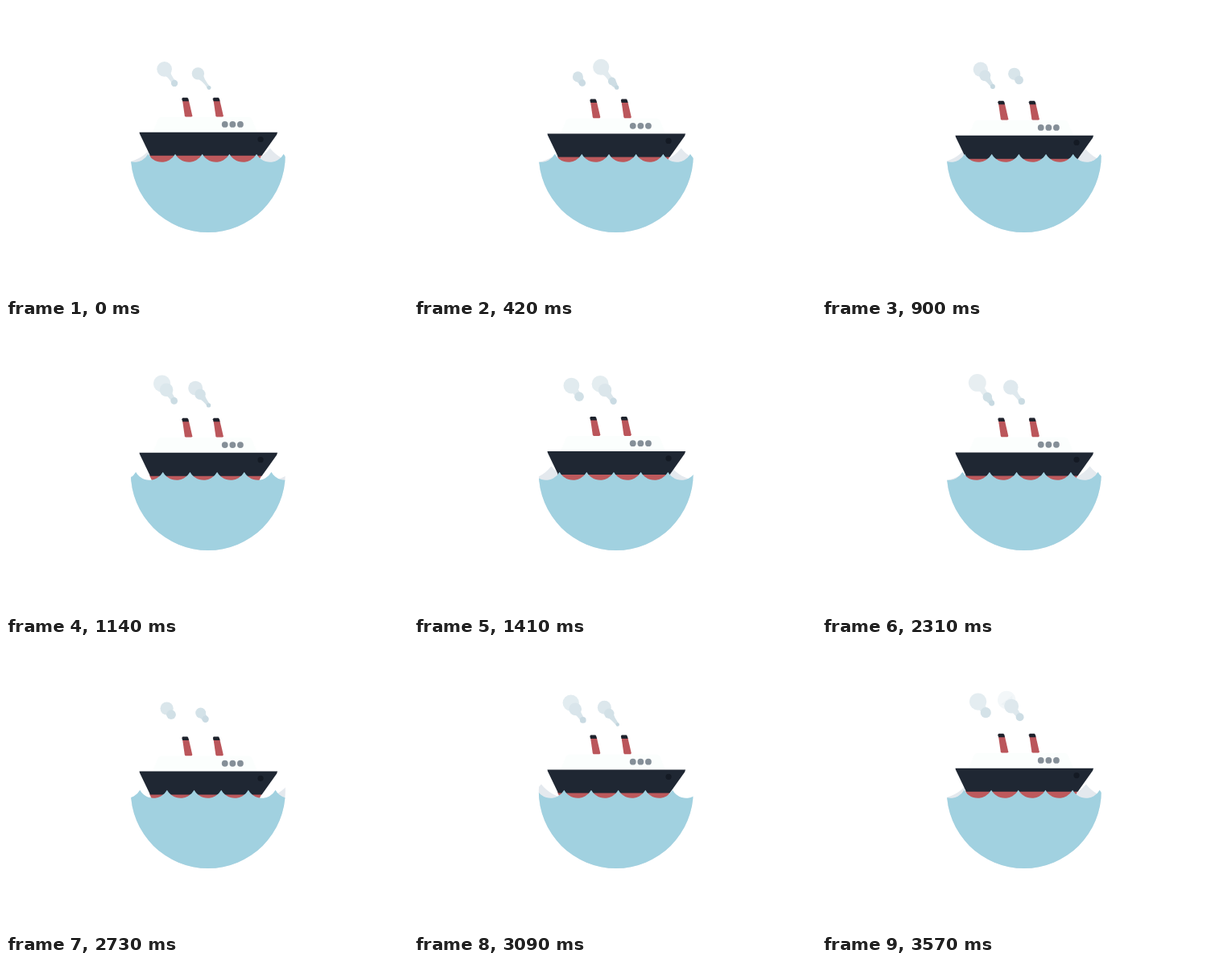
Animation of 499 by 360 pixels, one loop 3600 ms. Source, as an HTML page with a canvas:

```html
<!DOCTYPE html>
<html lang="en">
<head>
<meta charset="utf-8">
<title>Steamship</title>
<style>
html, body { margin: 0; width: 100%; height: 100%; overflow: hidden; background: #fff; }
canvas { display: block; }
</style>
</head>
<body>
<canvas id="stage" width="499" height="360"></canvas>
<script>
const ctx = document.getElementById('stage').getContext('2d');
const LOOP = 3600, BOB = 1750, PUFF = 2030, WAVE = 33.65, SWELL = 2.2;
const SEA = { x: 250.8, y: 185, r: 96 };
const GAPS = [0, 400, 1110];

function poly(color, ...pts) {
  ctx.fillStyle = color;
  ctx.beginPath();
  pts.forEach(([x, y]) => ctx.lineTo(x, y));
  ctx.closePath();
  ctx.fill();
}

function disc(color, x, y, r) {
  ctx.fillStyle = color;
  ctx.beginPath();
  ctx.arc(x, y, r, 0, Math.PI * 2);
  ctx.fill();
}

// Pinched bridge from one puff to the next, thinner the further apart.
function neck(color, a, b) {
  const d = Math.hypot(b.x - a.x, b.y - a.y);
  const nx = (a.y - b.y) / d, ny = (b.x - a.x) / d;
  const pinch = Math.max(0.5, 7 - d * 0.3);
  const at = (p, w) => [p.x + nx * w, p.y + ny * w];
  const mid = { x: (a.x + b.x) / 2, y: (a.y + b.y) / 2 };
  ctx.fillStyle = color;
  ctx.beginPath();
  ctx.moveTo(...at(a, a.r * 0.8));
  ctx.quadraticCurveTo(...at(mid, pinch), ...at(b, b.r * 0.8));
  ctx.lineTo(...at(b, -b.r * 0.8));
  ctx.quadraticCurveTo(...at(mid, -pinch), ...at(a, -a.r * 0.8));
  ctx.fill();
}

function smoke(x, drift, lag, t) {
  const puffs = GAPS
    .map(gap => ((t + lag - gap + PUFF) % PUFF) / PUFF)
    .filter(q => q > 0.18)
    .sort((a, b) => b - a)
    .map(q => ({ q, x: x - drift * q, y: 110 - 39 * q, r: 11.5 * q }));
  puffs.forEach((p, i) => {
    const next = puffs[i + 1];
    const color = `hsl(198 30% ${79 + 14 * p.q}%)`;
    ctx.globalAlpha = Math.min(1, (1 - p.q) * 20);
    if (next && p.q - next.q < 0.47) neck(color, p, next);
    disc(color, p.x, p.y, p.r);
  });
  ctx.globalAlpha = 1;
}

function funnel(x) {
  poly('#bb565b', [x + 0.7, 117], [x + 8.5, 117], [x + 13, 136.5], [x + 12, 138], [x + 4.5, 138], [x + 3.5, 136.5]);
  poly('#1e222c', [x, 115.5], [x + 1, 114], [x + 7, 114], [x + 8, 115.5], [x + 8.7, 118.5], [x + 0.8, 118.5]);
}

function ship(t) {
  ctx.save();
  ctx.translate(0, 1.7 - 2 * Math.cos(t / BOB * Math.PI * 2));
  funnel(218.3);
  funnel(256.8);
  poly('#fbfefd', [182, 157], [189, 140], [192, 138], [302, 138], [305, 140], [312, 157]);
  for (let i = 0; i < 3; i++) disc('#858f98', 271.7 + i * 9.6, 147.2, 3.9);
  poly('#bd595c', [178, 185], [317.5, 185], [310, 200], [185, 200]);
  poly('#1f2733', [165.5, 157], [337, 157], [336, 160], [317.5, 186], [179, 186], [166, 159]);
  disc('#141a24', 316, 165.8, 3.6);
  ctx.restore();
}

// A body of water whose top is a row of scallops, one crest at x = crest.
function waves(color, crest, length, sag, bottom) {
  const half = length / 2;
  const r = (half * half + sag * sag) / (2 * sag);
  const angle = Math.asin(half / r);
  ctx.fillStyle = color;
  ctx.beginPath();
  ctx.moveTo(80, 290);
  for (let x = 80 + (crest - 80) % length; x < 380; x += length) {
    ctx.arc(x + half, bottom - r, r, Math.PI / 2 + angle, Math.PI / 2 - angle, true);
  }
  ctx.lineTo(460, 290);
  ctx.fill();
}

function sea(...args) {
  ctx.save();
  ctx.beginPath();
  ctx.arc(SEA.x, SEA.y, SEA.r, 0, Math.PI * 2);
  ctx.clip();
  waves(...args);
  ctx.restore();
}

function draw(t) {
  const s = t / 1000;
  const flow = 76.2 * s - 0.8 * s ** 3;
  ctx.fillStyle = '#fff';
  ctx.fillRect(0, 0, 499, 360);
  smoke(219, 27.5, 730, t);
  smoke(258.5, 30, 440, t);
  sea('#e4e9ee', 1000 + 328 - SWELL * (flow + WAVE * 13) + SWELL * WAVE * 13 - 1000, SWELL * WAVE, 18, 194.5);
  ship(t);
  sea('#a1d1e0', 210 + flow, WAVE, 10, 193.8);
}

function tick() {
  draw(performance.now() % LOOP);
  requestAnimationFrame(tick);
}
tick();
</script>
</body>
</html>
```
